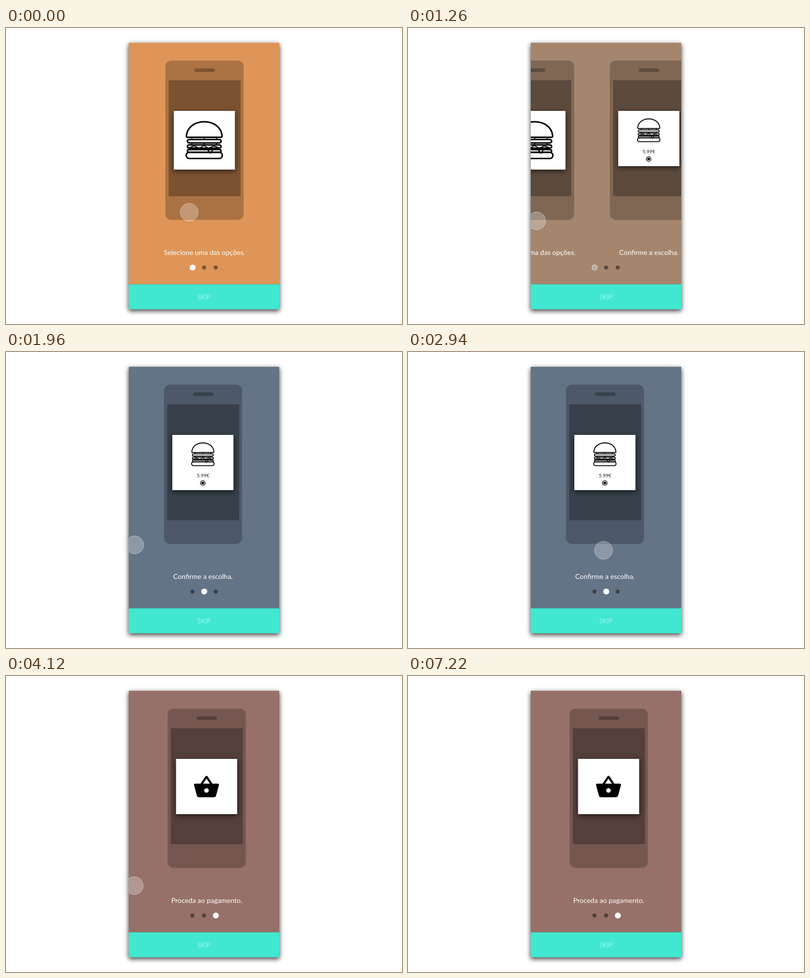
An HTML page with a canvas for the animation above (7.34 s loop, 800 by 600 pixels).

```html
<!DOCTYPE html>
<html lang="pt">
<head>
<meta charset="utf-8">
<title>Onboarding</title>
<style>
html, body { margin: 0; width: 100%; height: 100%; overflow: hidden; background: #fff; }
canvas { display: block; }
</style>
</head>
<body>
<canvas id="stage" width="800" height="600"></canvas>
<script>
const ctx = document.getElementById('stage').getContext('2d');
const LOOP = 7340;
const CARD = { x: 248, y: 30, w: 304, h: 540 };
const PAGE_STEP = 233;
const COLORS = [[222, 149, 87], [100, 116, 135], [151, 113, 105]];
const PAGES = [
  { x: 322, cardH: 119, label: 'Selecione uma das opções.' },
  { x: 319, cardH: 112, label: 'Confirme a escolha.' },
  { x: 326.5, cardH: 112, label: 'Proceda ao pagamento.' }
];
const DOTS = [376.7, 400.2, 423.6];
const BASKET = new Path2D('M17.21 9l-4.38-6.56c-.19-.28-.51-.42-.83-.42-.32 0-.64.14-.83.43L6.79 9H2c-.55 0-1 .45-1 1 0 .09.01.18.04.27l2.54 9.27c.23.84 1 1.46 1.92 1.46h13c.92 0 1.69-.62 1.93-1.46l2.54-9.27L23 10c0-.55-.45-1-1-1h-4.79zM9 9l3-4.4L15 9H9zm3 8c-1.1 0-2-.9-2-2s.9-2 2-2 2 .9 2 2-.9 2-2 2z');
const BUN = new Path2D('M-34 33.5Q-36.5 33.5-36 30C-34 12-18 2 0 2C18 2 34 12 36 30Q36.500 33.5 34 33.5Z');
const FILLING = new Path2D('M-25 34V38M0 34V38M25 34V38M-25 45V49M0 45V49M25 45V49M-31 55L-20 51L-10 56L-1 50L9 56L19 51L30 55M6 58L12.500 66L18 58');

const clamp = v => Math.max(0, Math.min(1, v));
const span = (t, start, length) => clamp((t - start) / length);
const mix = (a, b, k) => a + (b - a) * k;
const inOut = u => u * u * (3 - 2 * u);
const easeOut = u => 1 - (1 - u) ** 2;

// cubic-bezier(.4, 0, .2, 1)
function settle(u) {
  let lo = 0, hi = 1;
  for (let i = 0; i < 24; i++) {
    const s = (lo + hi) / 2, r = 1 - s;
    if (1.2 * r * r * s + 0.6 * r * s * s + s ** 3 < u) lo = s; else hi = s;
  }
  return 3 * (1 - lo) * lo * lo + lo ** 3;
}

const pagePos = t => settle(span(t, 979, 700)) + settle(span(t, 3353, 700));
const tintPos = t => span(t, 1168, 200) + span(t, 3470, 200);

function fingerAt(t) {
  const go = (a, b, k) => [mix(a[0], b[0], k), mix(a[1], b[1], k)];
  const hold = [395, 369.5], left = [260, 391], mid = [395, 402], low = [259, 425];
  if (t < 960) return go([370, 373.5], hold, easeOut(span(t, 0, 740)));
  if (t < 2200) return go(hold, left, inOut(span(t, 960, 290)));
  if (t < 3340) return go(left, mid, inOut(span(t, 2200, 740)));
  if (t < 4980) return go(mid, low, inOut(span(t, 3340, 310)));
  const u = span(t, 4980, 760);
  return u < 1 ? [mix(low[0], 590, u ** 2.95), mix(low[1], 30, u ** 3.336)] : null;
}

function box(x, y, w, h, r, fill) {
  ctx.beginPath();
  ctx.roundRect(x, y, w, h, r);
  if (fill) { ctx.fillStyle = fill; ctx.fill(); } else ctx.stroke();
}

function disc(x, y, r, fill) {
  ctx.beginPath();
  ctx.arc(x, y, r, 0, Math.PI * 2);
  ctx.fillStyle = fill;
  ctx.fill();
}

function text(str, x, y, font, fill) {
  ctx.font = font + ' Lato, sans-serif';
  ctx.textAlign = 'center';
  ctx.fillStyle = fill;
  ctx.fillText(str, x, y);
}

function shadowed(color, blur, dy, draw) {
  ctx.save();
  ctx.shadowColor = color;
  ctx.shadowBlur = blur;
  ctx.shadowOffsetY = dy;
  draw();
  ctx.restore();
}

function burger(x, y, scale) {
  ctx.save();
  ctx.translate(x, y);
  ctx.scale(scale, scale);
  ctx.strokeStyle = '#000';
  ctx.lineWidth = 3;
  ctx.lineJoin = 'round';
  ctx.stroke(BUN);
  box(-34, 38, 68, 7, 3.5);
  box(-34, 49, 68, 6.5, 3.2);
  box(-34, 58.5, 68, 5.5, 2.7);
  box(-36.500, 64, 73, 12.5, 6);
  ctx.lineWidth = 2;
  ctx.stroke(FILLING);
  ctx.restore();
}

function cardContent(i, cx) {
  if (i === 0) return burger(cx - 0.5, 188, 1);
  if (i === 1) {
    burger(cx - 0.3, 183, 0.62);
    text('5.99€', cx, 254, '10px', '#222');
    ctx.beginPath();
    ctx.arc(cx - 0.5, 265.5, 4.8, 0, Math.PI * 2);
    ctx.lineWidth = 1.3;
    ctx.strokeStyle = '#000';
    ctx.stroke();
    return disc(cx - 0.5, 265.5, 2.8, '#000');
  }
  ctx.save();
  ctx.translate(cx - 28.1, 197.5);
  ctx.scale(2.3, 2.3);
  ctx.fillStyle = '#000';
  ctx.fill(BASKET, 'evenodd');
  ctx.restore();
}

function page(i, shift) {
  const { x: rest, cardH, label } = PAGES[i];
  const x = rest + shift, cx = x + 79;
  box(x, 66, 158, 323, 12, 'rgba(0,0,0,.23)');
  box(x + 58.5, 82, 41.5, 7, 3.5, 'rgba(0,0,0,.28)');
  box(x + 6.5, 106, 145.5, 235, 0, 'rgba(0,0,0,.28)');
  shadowed('rgba(0,0,0,.65)', 10, 3, () => box(x + 17, 168, 123.5, cardH, 0, '#fff'));
  cardContent(i, cx);
  text(label, cx, 460, '14px', '#fff');
}

function pager(tint) {
  DOTS.forEach((x, i) => {
    disc(x, 485.5, 4.2, 'rgba(0,0,0,.44)');
    const d = Math.abs(tint - i);
    const on = tint < i ? clamp(1 - 2 * d) : clamp(1 - d);
    if (on > 0) disc(x + 0.3, 485.5, 6, `rgba(255,255,255,${on})`);
  });
}

function finger(x, y) {
  const glow = ctx.createRadialGradient(x, y, 17, x, y, 21.5);
  glow.addColorStop(0, 'rgba(0,0,0,.1)');
  glow.addColorStop(1, 'rgba(0,0,0,0)');
  ctx.beginPath();
  ctx.arc(x, y, 21.5, 0, Math.PI * 2);
  ctx.arc(x, y, 19, 0, Math.PI * 2, true);
  ctx.fillStyle = glow;
  ctx.fill();
  disc(x, y, 18.5, 'rgba(255,255,255,.26)');
  ctx.beginPath();
  ctx.arc(x, y, 18.3, 0, Math.PI * 2);
  ctx.lineWidth = 1;
  ctx.strokeStyle = 'rgba(255,255,255,.38)';
  ctx.stroke();
}

function draw(t) {
  const pos = pagePos(t), tint = tintPos(t);
  const from = Math.min(1, Math.floor(tint));
  const rgb = COLORS[from].map((c, k) => Math.round(mix(c, COLORS[from + 1][k], tint - from)));
  const { x, y, w, h } = CARD;

  ctx.fillStyle = '#fff';
  ctx.fillRect(0, 0, 800, 600);
  const base = `rgb(${rgb})`;
  shadowed('rgba(0,0,0,.3)', 10, 2, () => box(x, y, w, h, 0, base));
  shadowed('rgba(0,0,0,.55)', 9, 4, () => box(x, y, w, h, 0, base));

  ctx.save();
  ctx.beginPath();
  ctx.rect(x, y, w, h);
  ctx.clip();
  PAGES.forEach((_, i) => {
    if (Math.abs(i - pos) < 0.999) page(i, PAGE_STEP * (i - pos));
  });
  pager(tint);
  shadowed('rgba(0,0,0,.5)', 2, 0, () => box(x, 519.5, w, 50.5, 0, '#40e8cf'));
  text('SKIP', 400, 550, '300 13.5px', 'rgba(255,255,255,.92)');
  const touch = fingerAt(t);
  if (touch) finger(...touch);
  ctx.restore();
}

const start = performance.now();
function tick() {
  draw((performance.now() - start) % LOOP);
  requestAnimationFrame(tick);
}
tick();
</script>
</body>
</html>
```
